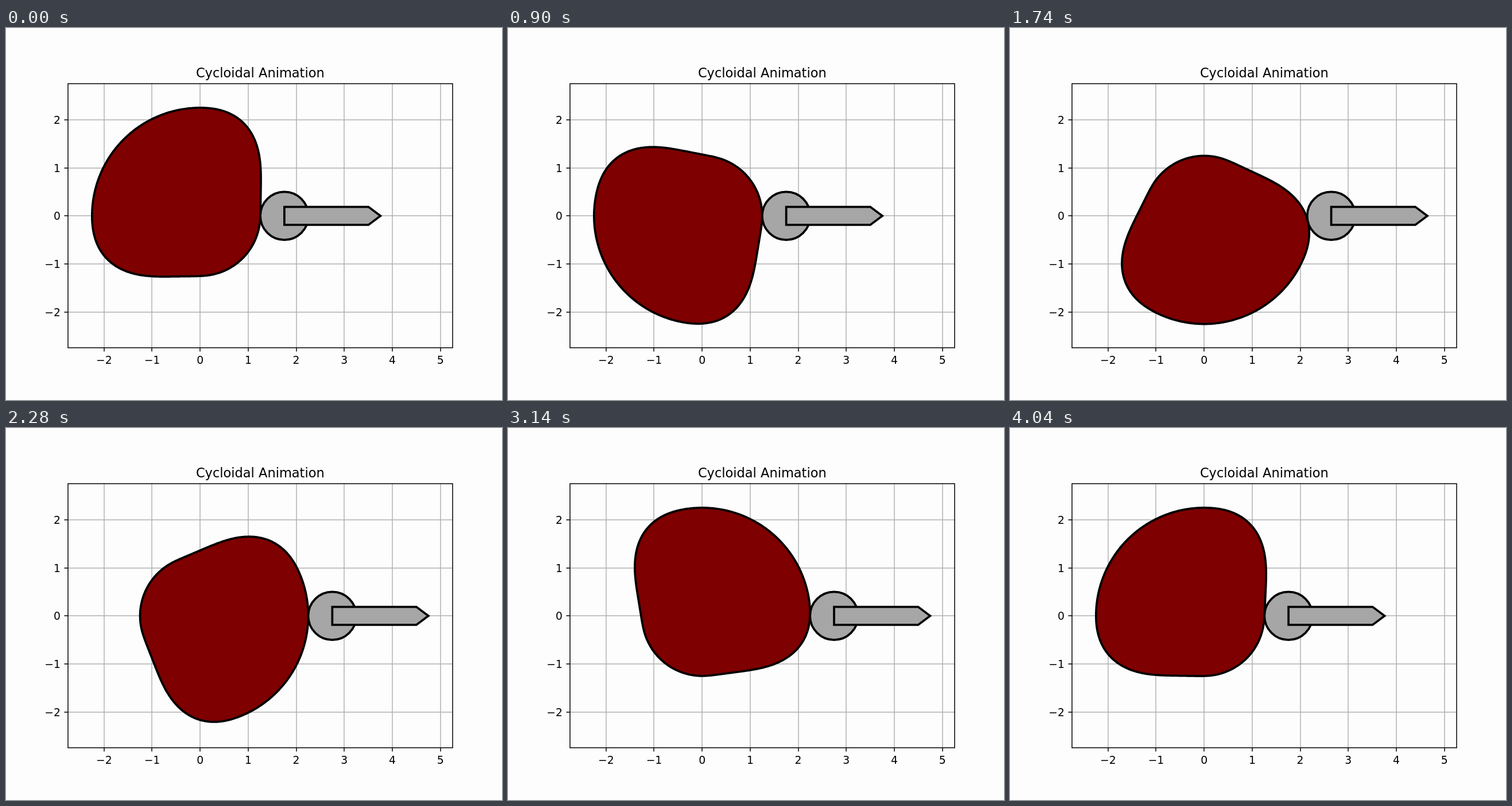
An HTML page with a canvas that plays this animation: 864 px wide and 648 px high, repeating every 4.06 s.

```html
<!DOCTYPE html>
<html lang="en">
<head>
<meta charset="utf-8">
<title>Cycloidal Animation</title>
<style>
  html, body { margin: 0; width: 100%; height: 100%; overflow: hidden; background: #fdfdfd; }
  canvas { display: block; }
</style>
</head>
<body>
<canvas id="stage" width="864" height="648"></canvas>
<script>
const ctx = document.getElementById('stage').getContext('2d');
const RAD = Math.PI / 180;

// Timing
const STEP = 20, STEPS = 203;

// Plot area in pixels; one unit is the same length on both axes
const UNIT = 83.7, X0 = 338.175, Y0 = 327.24;
const LEFT = 108, RIGHT = 778, TOP = 97, BOTTOM = 557;
const TICK = 6.56, THIN = 1.5, THICK = 3.75;
const px = x => X0 + x * UNIT;
const py = y => Y0 - y * UNIT;

// Cam: degrees for angles, plot units for lengths
const PITCH = 1.75, ROLLER = 0.5, LIFT = 1;
const HIGH_MID = 135, HIGH_HALF = 45, FLANK = 97.6;

function lift(deg) {
  const turn = (((deg - HIGH_MID) % 360) + 540) % 360 - 180;
  const u = Math.min(1, Math.max(0, (Math.abs(turn) - HIGH_HALF) / FLANK));
  return LIFT * (1 - u + Math.sin(2 * Math.PI * u) / (2 * Math.PI));
}

// Contact point of the roller on the cam, as the inner offset of the pitch curve
function camPoint(deg) {
  const r = PITCH + lift(deg);
  const dr = (lift(deg + 0.05) - lift(deg - 0.05)) / (0.1 * RAD);
  const c = Math.cos(deg * RAD), s = Math.sin(deg * RAD);
  const tx = dr * c - r * s, ty = dr * s + r * c;
  const k = ROLLER / Math.hypot(tx, ty);
  return [r * c - ty * k, r * s + tx * k];
}

const cam = Array.from({ length: 720 }, (_, i) => camPoint(i / 2));

function line(x1, y1, x2, y2) {
  ctx.beginPath();
  ctx.moveTo(x1, y1);
  ctx.lineTo(x2, y2);
  ctx.stroke();
}

function paint(fill) {
  ctx.fillStyle = fill;
  ctx.strokeStyle = '#000';
  ctx.lineWidth = THICK;
  ctx.fill();
  ctx.stroke();
}

function polygon(points, fill) {
  ctx.beginPath();
  points.forEach(([x, y]) => ctx.lineTo(px(x), py(y)));
  ctx.closePath();
  paint(fill);
}

function label(text, x, y, size, align) {
  ctx.font = size + 'px "DejaVu Sans", sans-serif';
  ctx.textAlign = align;
  ctx.fillStyle = '#000';
  ctx.fillText(text, x, y);
}

const signed = n => String(n).replace('-', '\u2212');
const range = (a, b) => Array.from({ length: b - a + 1 }, (_, i) => a + i);
const xTicks = range(-2, 5), yTicks = range(-2, 2);

function drawGrid() {
  ctx.strokeStyle = '#b0b0b2';
  ctx.lineWidth = THIN;
  for (const n of xTicks) line(Math.round(px(n)), TOP, Math.round(px(n)), BOTTOM);
  for (const n of yTicks) line(LEFT, Math.round(py(n)), RIGHT, Math.round(py(n)));
}

function drawAxes() {
  ctx.strokeStyle = '#000';
  ctx.lineWidth = THIN;
  for (const n of xTicks) {
    const x = Math.round(px(n));
    line(x, BOTTOM, x, BOTTOM + TICK);
    label(signed(n), px(n), 585, 18.75, 'center');
  }
  for (const n of yTicks) {
    const y = Math.round(py(n));
    line(LEFT - TICK, y, LEFT, y);
    label(signed(n), 94.9, py(n) + 7, 18.75, 'right');
  }
  ctx.strokeRect(LEFT, TOP, RIGHT - LEFT, BOTTOM - TOP);
  label('Cycloidal Animation', 442.8, 85.8, 22.5, 'center');
}

function draw(ms) {
  const step = Math.floor(ms / STEP) % STEPS;
  const turn = step * 360 / STEPS;
  const c = Math.cos(turn * RAD), s = Math.sin(turn * RAD);
  const x = PITCH + lift(-turn);

  ctx.fillStyle = '#fdfdfd';
  ctx.fillRect(0, 0, 864, 648);
  drawGrid();

  polygon(cam.map(([a, b]) => [a * c - b * s, a * s + b * c]), '#7e0000');

  ctx.beginPath();
  ctx.arc(px(x), py(0), ROLLER * UNIT, 0, 2 * Math.PI);
  paint('#a6a6a6');

  const h = 0.1875;
  polygon([[x, -h], [x, h], [x + 1.75, h], [x + 2, 0], [x + 1.75, -h]], '#a6a6a6');

  drawAxes();
}

const start = performance.now();
function tick() {
  draw(Math.max(0, performance.now() - start));
  requestAnimationFrame(tick);
}
tick();
</script>
</body>
</html>
```
